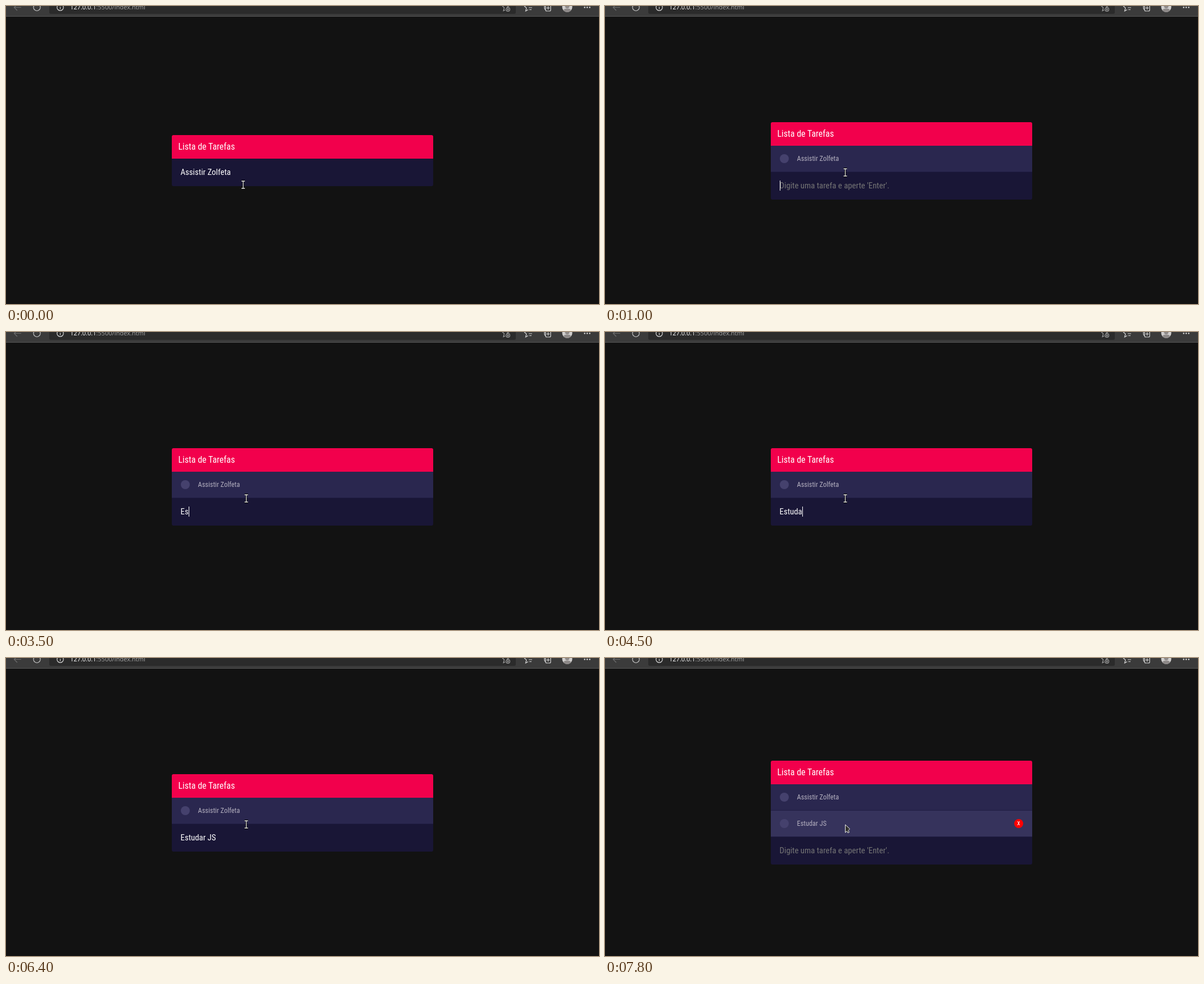
Recreate the animation shown at these times as an HTML page. Size 1055 px wide and 531 px high, loop 8 s.

```html
<!DOCTYPE html>
<html lang="pt-BR">
<head>
<meta charset="utf-8">
<title>Lista de Tarefas</title>
<style>
  html, body { margin: 0; width: 100%; height: 100%; overflow: hidden; background: #121212; }
  svg { position: absolute; left: 0; top: 0; }
  .url { font: 11px 'Noto Sans', sans-serif; }
  #card {
    position: absolute; left: 295px; width: 465px;
    border-radius: 3px; overflow: hidden; color: #fff;
    font-family: 'Roboto Condensed', Roboto, sans-serif; font-stretch: 75%; white-space: nowrap;
  }
  header { height: 42px; padding-left: 11.5px; background: #f2004c; font-size: 16px; line-height: 42px; }
  .item {
    position: relative; box-sizing: border-box; height: 47px; padding-left: 46.5px;
    border-bottom: 1px solid #211e43; background: #2a274f; color: #b5b1c0;
    font-size: 12.4px; line-height: 46px;
  }
  .item i {
    position: absolute; left: 15.5px; top: 15px; width: 16px; height: 16px;
    border-radius: 50%; background: #45416d;
  }
  #remove {
    position: absolute; right: 16px; top: 15px; width: 16px; height: 16px; border-radius: 50%;
    color: #fff; font-size: 12px; line-height: 15px; text-align: center;
  }
  #field { position: relative; height: 49px; padding-left: 15.5px; background: #191636; font-size: 14.85px; line-height: 49px; }
  #text { white-space: pre; }
  #caret { position: absolute; top: 15px; width: 1px; height: 18px; background: #fff; }
  .empty { color: #757575; }
</style>
</head>
<body>
<svg width="1055" height="20" fill="none" stroke="#d6d6d6" stroke-width="1.2">
  <path d="M0 0H1055V18H0Z" fill="#3b3b3b" stroke="none"/>
  <path d="M0 18.5H1055" stroke="#565656" stroke-width="1"/>
  <path d="M77 0H907V11Q907 14 904 14H80Q77 14 77 11Z" fill="#2b2b2b" stroke="none"/>
  <path d="M27 2.5H15M20 -3L14.5 2.5L20 8" stroke="#6d6d6d"/>
  <path d="M60 -1A6 6 0 1 1 50 -1"/>
  <circle cx="96.5" cy="2.5" r="5.7"/>
  <path d="M96.5 1.5V5.5M96.5 -1V0"/>
  <text class="url" x="114" y="6" stroke="none" fill="#f2f2f2">127.0.0.1<tspan fill="#9c9c9c">:5500/index.html</tspan></text>
  <g stroke="#a0a0a0">
    <path d="M883 0L886.5 3L885 8.5L888 7M895 0L891 2"/>
    <circle cx="893" cy="6" r="3.4"/>
    <path d="M891 6H895M893 4V8"/>
  </g>
  <path d="M922 0L926 3.5L924.5 9L929 6.5M929 -.5H936M930 3H936M931 6.5H935"/>
  <path d="M958 -1V4Q958 6 960.5 7M960 -1V7Q960 9 962 9H967Q969 9 969 7V1Q969 -1 967 -1M961.5 3.5H967.5M964.5 .5V6.5"/>
  <g stroke="none">
    <circle cx="998.5" cy="2" r="9" fill="#d0cecd"/>
    <path d="M992 8Q992 4.5 998.5 4.5Q1005 4.5 1005 8Q1002 11 998.5 11Q995 11 992 8Z" fill="#8d8988"/>
    <circle cx="998.5" cy="0" r="4" fill="#8d8988"/>
    <g fill="#e4e4e4"><circle cx="1029.5" cy="2.5" r="1.2"/><circle cx="1034" cy="2.5" r="1.2"/><circle cx="1038.5" cy="2.5" r="1.2"/></g>
  </g>
</svg>

<div id="card">
  <header>Lista de Tarefas</header>
  <div class="item" id="first"><i></i>Assistir Zolfeta</div>
  <div class="item" id="second"><i></i>Estudar JS<span id="remove">x</span></div>
  <div id="field"><span id="text"></span><span id="caret"></span></div>
</div>

<svg width="1055" height="531">
  <g id="beam" fill="none">
    <path id="stem" d="M-3 -7H-1L0 -6L1 -7H3M0 -6V6M-3 7H-1L0 6L1 7H3" stroke="#000" stroke-width="3"/>
    <path d="M-3 -6.5H3M0 -6.5V6.5M-3 6.5H3" stroke="#e8e8e8" stroke-width="1.3"/>
  </g>
  <path id="arrow" d="M427.5 297V311L430.5 308.5L432 311.5L434.5 310.5L433 307.5L435.5 304.5Z" fill="#33332f" stroke="#eee"/>
</svg>

<script>
const $ = id => document.getElementById(id);
const LOOP = 8000;
const HINT = "Digite uma tarefa e aperte 'Enter'.";
const FIRST = 'Assistir Zolfeta';
const SECOND = 'Estudar JS';
const PAD = 15.5;
const keys = [3200, 3500, 3700, 4100, 4300, 4500, 4800, 5000, 5600, 6000];
const blinks = [600, 1000, 1000, 1200, 1800, 2400, 2800, 6400, 7200, 7800];   // caret toggles
const added = [1000, 7000];                                                   // Enter presses
const moves = [[0, 422, 318.5], [100, 424, 307.5], [300, 427.5, 296.5]];
const passed = (times, t) => times.filter(k => k <= t).length;
const show = (id, on) => $(id).style.display = on ? '' : 'none';

function draw(t) {
  const count = passed(added, t);
  const typed = [FIRST, SECOND.slice(0, passed(keys, t)), ''][count];
  $('card').style.top = [230, 207, 183][count] + 'px';
  show('first', count > 0);
  show('second', count > 1);
  $('text').textContent = typed || HINT;
  $('text').className = typed ? '' : 'empty';
  const width = typed ? $('text').getBoundingClientRect().width : 0;
  $('caret').style.left = Math.round(PAD + width) + 'px';
  show('caret', passed(blinks, t) % 2);

  const settled = t >= 7200;
  $('second').style.background = settled ? '#36335c' : '#343159';
  $('remove').style.background = settled ? '#ff0000' : '#e3060f';
  const [, x, y] = moves[passed(moves.map(m => m[0]), t) - 1];
  $('beam').setAttribute('transform', `translate(${x} ${y})`);
  show('beam', count < 2);
  show('arrow', count === 2);
}

const start = performance.now();
function tick() {
  draw((performance.now() - start) % LOOP);
  requestAnimationFrame(tick);
}
tick();
</script>
</body>
</html>
```
